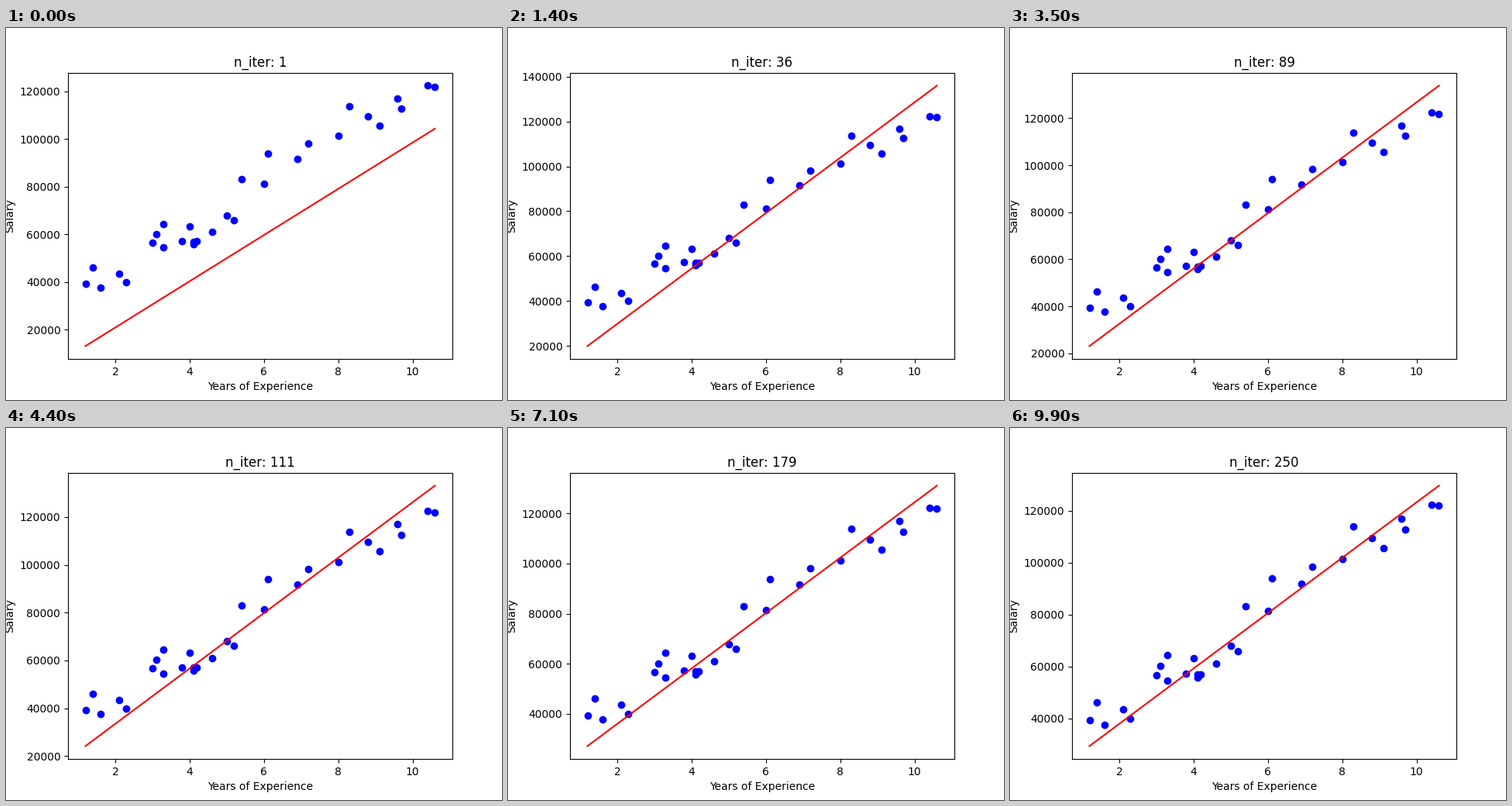
A matplotlib script that plays this animation: 640 px wide and 480 px high, repeating every 10000 ms.

```python
import numpy as np
import matplotlib.pyplot as plt
from matplotlib.animation import FuncAnimation

FRAMES, INTERVAL = 100, 100
STEPS, RATE = 250, 0.01

years = np.array([
    1.2, 1.4, 1.6, 2.1, 2.3, 3.0, 3.1, 3.3, 3.3, 3.8,
    4.0, 4.1, 4.1, 4.2, 4.6, 5.0, 5.2, 5.4, 6.0, 6.1,
    6.9, 7.2, 8.0, 8.3, 8.8, 9.1, 9.6, 9.7, 10.4, 10.6])
salary = np.array([
    39344, 46206, 37732, 43526, 39892, 56643, 60151, 54446, 64446, 57190,
    63219, 55795, 56958, 57082, 61112, 67939, 66030, 83089, 81364, 93941,
    91739, 98274, 101303, 113813, 109432, 105583, 116970, 112636, 122392,
    121873])


def descend(x, y, steps, rate):
    """Return (slope, intercept) after every gradient descent step from zero."""
    w = b = 0.0
    path = [(w, b)]
    for _ in range(steps):
        err = w * x + b - y
        w, b = w - rate * 2 * np.mean(err * x), b - rate * 2 * np.mean(err)
        path.append((w, b))
    return path


path = descend(years, salary, STEPS, RATE)
iters = np.linspace(1, STEPS, FRAMES).astype(int)

fig, ax = plt.subplots(figsize=(6.4, 4.8), dpi=100)
ax.scatter(years, salary, color="blue")
line, = ax.plot(years, salary, color="red")
ax.set_xlabel("Years of Experience")
ax.set_ylabel("Salary")


def update(i):
    n = iters[i]
    w, b = path[n]
    fit = w * years + b
    line.set_ydata(fit)
    low, high = min(fit.min(), salary.min()), max(fit.max(), salary.max())
    pad = 0.05 * (high - low)
    ax.set_ylim(low - pad, high + pad)
    ax.set_title(f"n_iter: {n}")
    return line,


anim = FuncAnimation(fig, update, frames=FRAMES, interval=INTERVAL,
                     repeat=True, repeat_delay=0, blit=False)
plt.show()
```
